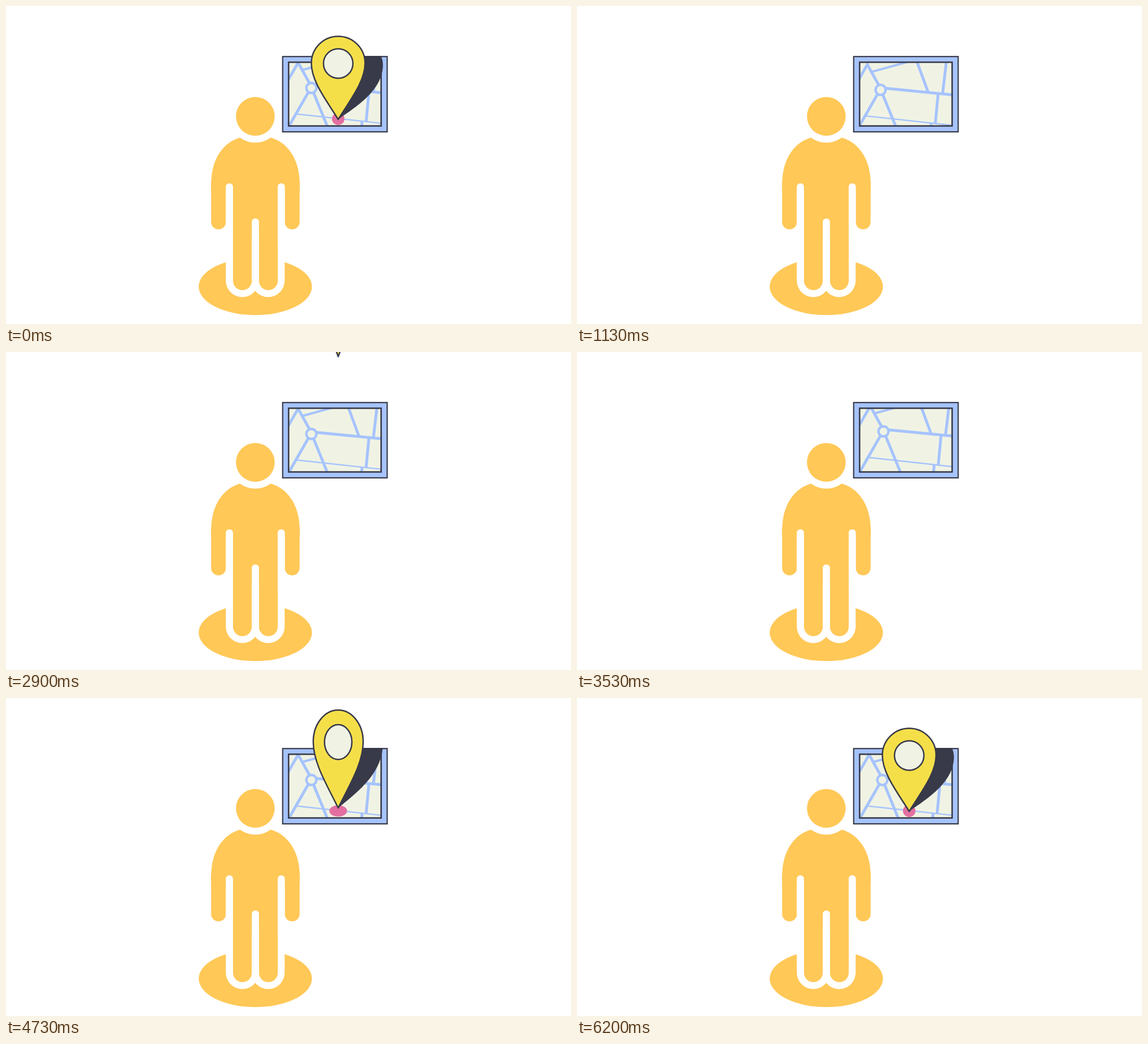
Write an HTML page with a canvas that moves like this. It is 998x561 px and loops after 6.23 s.

```html
<!DOCTYPE html>
<html lang="en">
<head>
<meta charset="utf-8">
<title>Person and map pin</title>
<style>
  html, body { margin: 0; width: 100%; height: 100%; overflow: hidden; background: #fff; }
  canvas { display: block; }
</style>
</head>
<body>
<canvas id="stage" width="998" height="561"></canvas>
<script>
const ctx = document.getElementById('stage').getContext('2d');
const LOOP = 6230, CYCLES = 3, STEPS = 52;
const ORANGE = '#ffc857', DARK = '#383a49', BLUE = '#a6c3fd',
      CREAM = '#f0f3e4', YELLOW = '#f5df49', PINK = '#e36fa1', WHITE = '#ffffff';
const TIP = { x: 586.8, y: 200 };

function ellipse(x, y, rx, ry, fill) {
  ctx.beginPath();
  ctx.ellipse(x, y, rx, ry, 0, 0, Math.PI * 2);
  ctx.fillStyle = fill;
  ctx.fill();
}

function pill(x, y, w, h, r, fill) {
  ctx.beginPath();
  ctx.roundRect(x, y, w, h, r);
  ctx.fillStyle = fill;
  ctx.fill();
}

function line(width, color, ...points) {
  ctx.beginPath();
  points.forEach(([x, y]) => ctx.lineTo(x, y));
  ctx.lineWidth = width;
  ctx.strokeStyle = color;
  ctx.stroke();
}

function drawPerson() {
  ellipse(440.4, 495, 100, 50.3, ORANGE);
  for (const x of [388.3, 434]) pill(x, 400, 58.2, 113.5, [0, 0, 29, 29], WHITE);

  const shoulders = new Path2D(
    'M362.3 315 C362.3 268 385 240 414 232 H467 C496 240 518.8 268 518.8 315 V325 H362.3 Z');
  ctx.fillStyle = ORANGE;
  ctx.fill(shoulders);
  for (const x of [362.3, 492.4]) pill(x, 310, 26.2, 84, [0, 0, 13, 13], ORANGE);
  ctx.fillStyle = ORANGE;
  ctx.fillRect(401, 310, 79, 100);
  for (const x of [401, 446.8]) pill(x, 380, 33.2, 121.3, [0, 0, 16.5, 16.5], ORANGE);

  ctx.lineCap = 'round';
  for (const x of [394.6, 486.2]) line(12.6, WHITE, [x, 319], [x, 420]);
  line(12.6, WHITE, [440.5, 381], [440.5, 490]);
  ctx.lineCap = 'butt';

  ellipse(440.4, 195, 46, 46, WHITE);
  ellipse(440.4, 194.7, 34.2, 34.2, ORANGE);
}

function drawRoads() {
  line(5, BLUE, [431, 248], [516, 100], [536, 136]);
  line(4, BLUE, [523, 113], [570, 100], [661, 75]);
  line(5, BLUE, [539.5, 141], [760, 162.5]);
  line(5, BLUE, [584, 40], [605.5, 100], [623.5, 149]);
  line(5, BLUE, [662, 40], [655, 100], [649, 151]);
  line(5, BLUE, [641, 152], [636, 205]);
  line(5, BLUE, [629, 204], [623, 260]);
  line(2.4, BLUE, [513, 190.5], [760, 217.5]);
  line(5, BLUE, [537, 147], [466, 271]);
  line(5, BLUE, [540, 145], [592, 272]);
  ellipse(539.4, 144.6, 11, 11, BLUE);
  ellipse(539.4, 144.6, 6.7, 6.7, CREAM);
}

// The map is dragged down-left, swung through its rest place and released.
function mapOffset(step) {
  const s = (step - 20) / 16.4;
  if (s <= 0 || s >= 1) return [0, 0];
  const swing = -48 * Math.sin(s * Math.PI * 2) * Math.min(1, 4.4 * Math.sqrt(s * (1 - s)));
  const drift = -1.6 * Math.sin(s * Math.PI);
  return [swing * 0.425 + drift, -swing * 0.905];
}

// Pose of the pin: stretch, lift, and the size of the spot under it.
function pinPose(step) {
  const pose = { sx: 1, sy: 1, shade: 1, lift: 0, rx: 11, ry: 10.8 };
  if (step < 8) return pose;
  if (step < 23) {
    const k = (step - 8) / 6;
    const shrink = Math.max(0, Math.min(1, (11 - 6 * k) / 4));
    pose.sy = 1 + Math.min(0.4, 0.18 * k * k);
    pose.sx = 1 - Math.min(0.16, 0.07 * k * k);
    pose.lift = 6 * k ** 5;
    pose.rx = (11 + 4.7 * Math.min(1, k)) * shrink;
    pose.ry = (10.8 - 0.8 * Math.min(1, k)) * shrink;
    return pose;
  }
  if (step < 38) return null;
  const k = step - 39;
  if (k < 0) {
    return { sx: 0.6, sy: 0.6, shade: 0.6, lift: 0, rx: 6, ry: 6 };
  }
  const wobble = 0.5 * Math.exp(-0.3 * k) * Math.sin(k * Math.PI / 4);
  pose.sy = 1 + wobble;
  pose.sx = 1 - 0.38 * wobble;
  pose.rx = 11 + 8 * wobble;
  return pose;
}

const shadowShape = new Path2D('M0 0 C28 -20 79 -50 79 -96 C79 -116 63 -134 43 -134 L10 -134 Z');
const pinShape = new Path2D(
  'M0 0 C-21 -34 -47.4 -67 -47.4 -99 A47.4 47.4 0 0 1 47.4 -99 C47.4 -67 21 -34 0 0 Z');
const holeShape = new Path2D();
holeShape.arc(0, -98.5, 26, 0, Math.PI * 2);

// Scales the outline only, so that the line keeps its weight.
function shape(path, pose, sx, fill, stroked) {
  const placed = new Path2D();
  placed.addPath(path, new DOMMatrix([sx, 0, 0, pose.sy, TIP.x, TIP.y - pose.lift]));
  ctx.fillStyle = fill;
  ctx.fill(placed);
  if (!stroked) return;
  ctx.lineWidth = 2.5;
  ctx.strokeStyle = DARK;
  ctx.lineJoin = 'round';
  ctx.stroke(placed);
  ctx.lineJoin = 'miter';
}

function drawMap(step, pose) {
  ctx.fillStyle = BLUE;
  ctx.fillRect(488.7, 89.2, 184.6, 132.8);
  ctx.save();
  ctx.beginPath();
  ctx.rect(499.2, 99.2, 163.4, 112.4);
  ctx.fillStyle = CREAM;
  ctx.fill();
  ctx.clip();
  ctx.translate(...mapOffset(step));
  drawRoads();
  ctx.restore();

  if (pose) ellipse(TIP.x, 199.2, pose.rx, pose.ry, PINK);
  ctx.strokeStyle = DARK;
  ctx.lineWidth = 2.6;
  ctx.strokeRect(499.2, 99.2, 163.4, 112.4);
  ctx.lineWidth = 2.2;
  ctx.strokeRect(488.7, 89.2, 184.6, 132.8);
}

function drawPin(pose) {
  ctx.save();
  ctx.beginPath();
  ctx.rect(487.6, 88.1, 186.8, 135);
  ctx.clip();
  shape(shadowShape, pose, pose.shade, DARK, false);
  ctx.restore();
  shape(pinShape, pose, pose.sx, YELLOW, true);
  shape(holeShape, pose, pose.sx, CREAM, true);
}

function draw(now) {
  const cycle = LOOP / CYCLES;
  const step = Math.floor((now % cycle) / cycle * STEPS);
  const pose = pinPose(step);
  ctx.fillStyle = WHITE;
  ctx.fillRect(0, 0, 998, 561);
  drawPerson();
  drawMap(step, pose);
  if (pose) drawPin(pose);
}

const start = performance.now();
function tick() {
  draw(performance.now() - start);
  requestAnimationFrame(tick);
}
tick();
</script>
</body>
</html>
```
